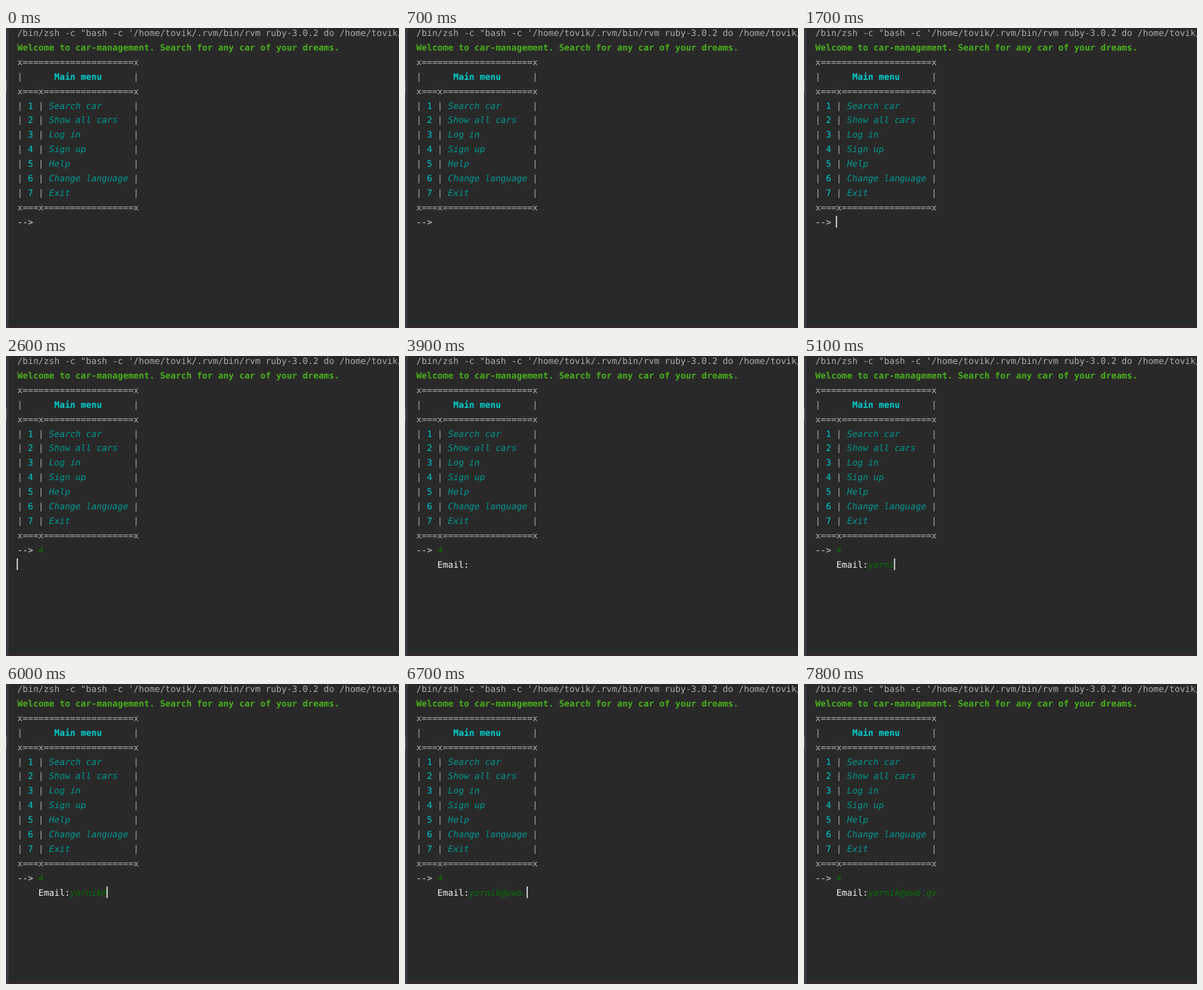
Recreate the animation shown at these times as an HTML page. Size 592 by 452 pixels, loop 8 s.

```html
<!DOCTYPE html>
<html lang="en">
<head>
<meta charset="utf-8">
<title>Terminal menu</title>
<style>
  html, body { margin: 0; width: 100%; height: 100%; overflow: hidden; background: #292929; }
  svg { display: block; }
  text {
    font: 13.22px "DejaVu Sans Mono", monospace;
    font-variant-ligatures: none;
    text-rendering: geometricPrecision;
    white-space: pre;
    fill: #acacac;
  }
  .hello { fill: #4bb01c; font-weight: bold; }
  .title { fill: #00cfcf; font-weight: bold; }
  .num { fill: #00cccc; }
  .item { fill: #009a92; font-style: italic; }
  .prompt { fill: #d6d6d6; }
  .label { fill: #f4f4f4; }
  .input { fill: #0a700a; font-style: italic; }
</style>
</head>
<body>
<svg id="stage" width="592" height="452" viewBox="0 0 592 452">
  <rect width="592" height="452" fill="#292929"/>
  <rect width="4" height="452" fill="#363a3d"/>
  <rect y="79" width="1" height="19" fill="#6a6c6d"/>
  <rect x="4" y="448" width="588" height="4" fill="#30292b"/>
</svg>
<script>
const NS = "http://www.w3.org/2000/svg";
const stage = document.getElementById("stage");
const LEFT = 17, CHAR = 7.96, LINE = 21.9, LOOP = 8000;
const EMAIL = "yornik@pwo.gv";
const KEYS = [4300, 4500, 4600, 4900, 5100, 5400, 6000, 6200, 6400, 6600, 6700, 6900, 7200];

const colX = col => LEFT + CHAR * col;

function add(tag, attrs) {
  const el = document.createElementNS(NS, tag);
  for (const key in attrs) el.setAttribute(key, attrs[key]);
  return stage.appendChild(el);
}

function write(row, col, str, cls = "") {
  const el = add("text", { x: colX(col), y: 12 + LINE * row, class: cls });
  el.textContent = str;
  return el;
}

const wideRule = "x" + "=".repeat(21) + "x";
const splitRule = "x===x" + "=".repeat(17) + "x";

write(0, 0, "/bin/zsh -c \"bash -c '/home/tovik/.rvm/bin/rvm ruby-3.0.2 do /home/tovik/");
write(1, 0, "Welcome to car-management. Search for any car of your dreams.", "hello");
write(2, 0, wideRule);
write(3, 0, "|");
write(3, 7, "Main menu", "title");
write(3, 22, "|");
write(4, 0, splitRule);
["Search car", "Show all cars", "Log in", "Sign up", "Help", "Change language", "Exit"]
  .forEach((name, i) => {
    const row = 5 + i;
    for (const col of [0, 4, 22]) write(row, col, "|");
    write(row, 2, String(i + 1), "num");
    write(row, 6, name, "item");
  });
write(12, 0, splitRule);
write(13, 0, "-->", "prompt");

const choice = write(13, 4, "4", "input");
const label = write(14, 4, "Email:", "label");
const email = write(14, 10, "", "input");
const caret = add("rect", { width: 1.8, height: 17.5, fill: "#dcdcdc" });

const show = (el, on) => el.setAttribute("visibility", on ? "visible" : "hidden");

// Caret cell as [row, col], or null while it is blinked off
function caretCell(t, typed) {
  if (t < 2500) return (t >= 300 && t < 700) || (t >= 1700 && t < 2200) ? [13, 4] : null;
  if (t < 2600) return [13, 5];
  if (t < 2900) return [14, 0];
  if (t < 3900) return [14, 10];
  if (t < 4300 || t >= 7800) return null;
  return [14, 10 + typed];
}

function draw(t) {
  const typed = KEYS.filter(k => t >= k).length;
  show(choice, t >= 2500);
  show(label, t >= 2900);
  email.textContent = EMAIL.slice(0, typed);
  const cell = caretCell(t, typed);
  show(caret, cell);
  if (cell) {
    caret.setAttribute("x", colX(cell[1]) - 0.9);
    caret.setAttribute("y", LINE * cell[0] - 1.6);
  }
}

const start = performance.now();
function tick() {
  draw((performance.now() - start) % LOOP);
  requestAnimationFrame(tick);
}
draw(0);
requestAnimationFrame(tick);
</script>
</body>
</html>
```
